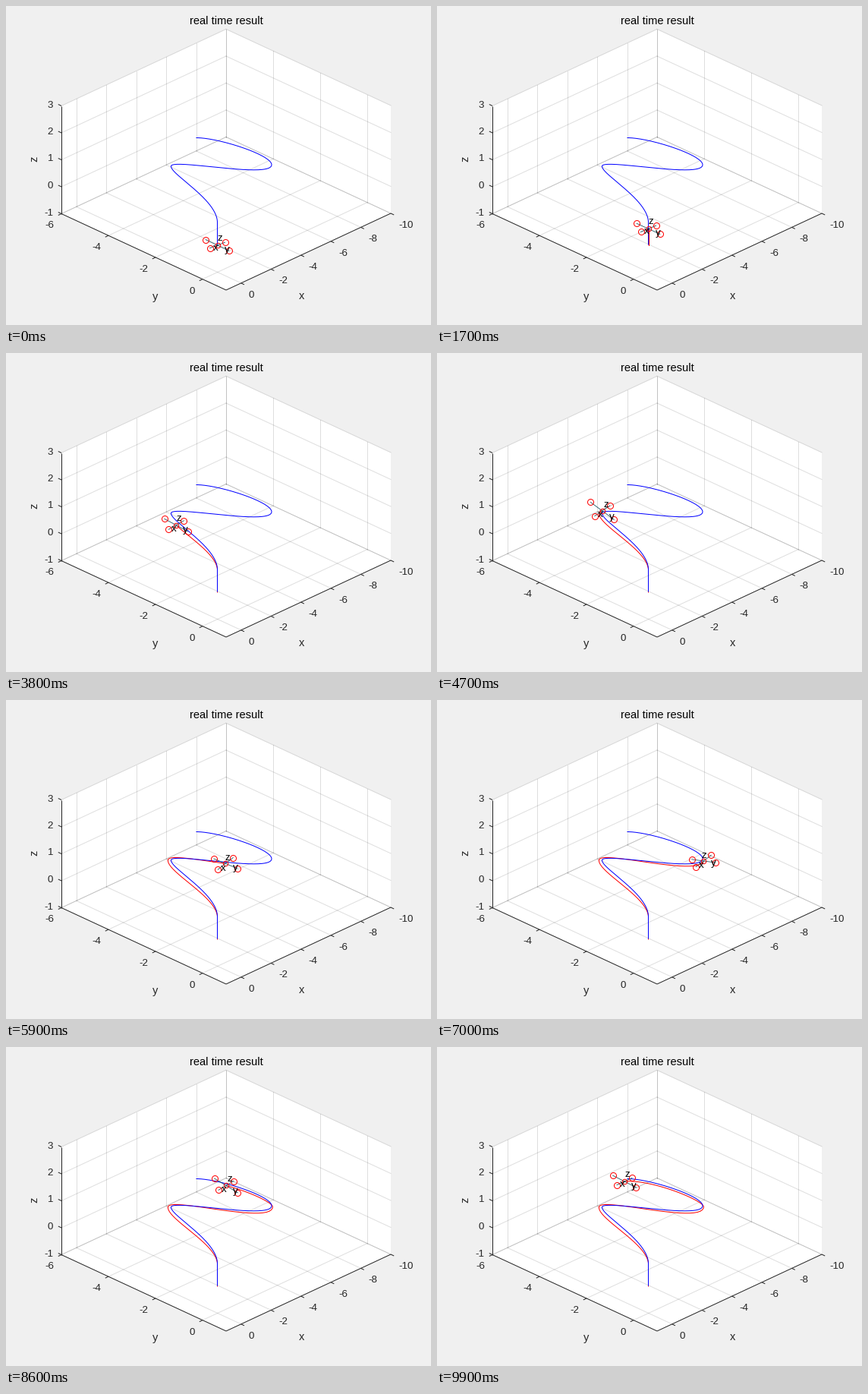
A matplotlib script that plays this animation: 560x420 px, repeating every 10000 ms.

```python
import numpy as np
import matplotlib.pyplot as plt
from matplotlib.animation import FuncAnimation

W, H = 560, 420
PX = 0.72            # points per pixel at 100 dpi
FRAMES, STEP = 100, 100
INK = (0.15, 0.15, 0.15)

plt.rcParams["font.family"] = "Liberation Sans"
fig = plt.figure(figsize=(W / 100, H / 100), dpi=100, facecolor="#f0f0f0")
ax = fig.add_axes([0, 0, 1, 1])
ax.set_xlim(0, W)
ax.set_ylim(H, 0)
ax.axis("off")


def project(x, y, z):
    """World point to stage pixel."""
    u, v = (1 - x) / 11, (1 - y) / 7
    return 290 + 217 * (u - v), 374 - 101 * u - 100.5 * v - 35.5 * (z + 1)


def line3(a, b, **style):
    ax.plot(*zip(project(*a), project(*b)), lw=PX, **style)


def label(x, y, s, size=13.33, color=INK, **kw):
    kw.setdefault("va", "baseline")
    return ax.text(x, y, s, fontsize=size * PX, color=color, **kw)


def bezier(pts, u):
    """Curve of any degree by repeated interpolation."""
    pts = [np.array(p, float) for p in pts]
    u = np.reshape(u, (-1, 1))
    while len(pts) > 1:
        pts = [a + (b - a) * u for a, b in zip(pts, pts[1:])]
    return pts[0]


# Box walls
walls = [
    [(1, 1, -1), (-10, 1, -1), (-10, -6, -1), (1, -6, -1)],
    [(1, -6, -1), (-10, -6, -1), (-10, -6, 3), (1, -6, 3)],
    [(-10, 1, -1), (-10, -6, -1), (-10, -6, 3), (-10, 1, 3)],
]
for wall in walls:
    ax.fill(*zip(*(project(*p) for p in wall)), color="white", lw=0)

# Grid, ticks and tick labels
grid = dict(color=INK, alpha=0.15)
axis = dict(color=INK, solid_capstyle="butt")


def tick(p, dx, dy):
    x, y = project(*p)
    ax.plot([x, x + dx], [y, y + dy], lw=PX, **axis)
    return x, y


for x in range(-10, 1, 2):
    line3((x, 1, -1), (x, -6, -1), **grid)
    line3((x, -6, -1), (x, -6, 3), **grid)
    tx, ty = tick((x, 1, -1), 4.2, 2)
    label(tx + 10, ty + 19, str(x))
for y in range(-6, 1, 2):
    line3((1, y, -1), (-10, y, -1), **grid)
    line3((-10, y, -1), (-10, y, 3), **grid)
    tx, ty = tick((1, y, -1), -4.2, 2)
    label(tx - 10, ty + 19, str(y), ha="right")
for z in range(-1, 4):
    line3((1, -6, z), (-10, -6, z), **grid)
    line3((-10, -6, z), (-10, 1, z), **grid)
    tx, ty = tick((1, -6, z), -4.2, -2)
    label(tx - 11, ty + 2, str(z), ha="right")

line3((1, -6, -1), (1, -6, 3), **axis)
line3((1, -6, -1), (1, 1, -1), **axis)
line3((1, 1, -1), (-10, 1, -1), **axis)

label(290, 24, "real time result", 14.67, "black", ha="center")
label(389.5, 386.5, "x", 14.67, ha="center")
label(197, 386.5, "y", 14.67, ha="center")
label(37, 201.5, "z", 14.67, ha="center", va="center", rotation=90)

# Planned path: climb, left turn, right turn, final leg
plan = [
    [(278.5, 314), (278.5, 285)],
    [(278.5, 285), (278.5, 255), (217, 222), (217.5, 211)],
    [(217.5, 211), (217, 200), (350, 228), (350, 209)],
    [(350, 209), (350, 196), (280, 173.5), (251, 173.5)],
]
route = np.vstack([bezier(p, np.linspace(0, 1, 80)) for p in plan])


def ease_in(p):
    return lambda s: s ** p


def ease_out(p):
    return lambda s: 1 - (1 - s) ** p


# Flown legs: start, end (s), easing, control points
legs = [
    (0, 2, ease_in(2), [(278.5, 315), (278.5, 285)]),
    (2, 4.3, ease_in(1.25),
     [(278.5, 285), (277, 259), (213, 227), (213.3, 211)]),
    (4.3, 7.05, ease_in(1.15),
     [(213.3, 211), (213, 196), (350, 235), (351.5, 210.5)]),
    (7.05, 9.9, ease_out(1.4),
     [(351.5, 210.5), (351, 202), (283, 174), (247, 177)]),
]


def position(t):
    for t0, t1, ease, pts in legs:
        if t <= t1:
            break
    return bezier(pts, ease(min((t - t0) / (t1 - t0), 1)))[0]


def attitude(t):
    """Half-arms along y and x, and the z axis, in pixels."""
    swell = np.exp(-((t - 6.3) / 2.9) ** 2)
    lean = 5.6 * swell * np.cos(2 * np.pi * (t - 4.65) / 4.5)
    return np.array([(15.4, 7.3 + lean),
                     (-10, 3.7 + 4.2 * swell),
                     (0.5 * lean, -10.6 + 2 * swell)])


# The craft rests for the first two steps
clock = [0 if n < 2 else n * STEP / 1000 for n in range(FRAMES)]
centers = np.array([position(t) for t in clock])

trail, = ax.plot([], [], color="red", lw=PX, zorder=3)
ax.plot(*route.T, color="blue", lw=PX, zorder=4)
arms = [ax.plot([], [], color="#14505f", lw=0.8 * PX, zorder=5)[0]
        for _ in range(2)]
ring = dict(ls="", marker="o", mfc="none", mec="red", mew=PX, zorder=6)
rotors, = ax.plot([], [], ms=8 * PX, **ring)
hub, = ax.plot([], [], ms=6.5 * PX, **ring)
names = [label(0, 0, s, color="black", zorder=7) for s in "yxz"]


def draw(n):
    c = centers[n]
    ya, xa, za = attitude(clock[n])
    trail.set_data(*centers[:n + 1].T)
    for arm, v in zip(arms, (ya, xa)):
        arm.set_data(*np.array([c - v, c + v]).T)
    rotors.set_data(*np.array([c - ya, c + ya, c - xa, c + xa]).T)
    hub.set_data([c[0]], [c[1]])
    for name, v in zip(names, (0.6 * ya, 0.6 * xa, za)):
        name.set_position(c + v + (0, 4.5))
    return [trail, *arms, rotors, hub, *names]


anim = FuncAnimation(fig, draw, frames=FRAMES, interval=STEP,
                     init_func=lambda: draw(0), repeat=True, repeat_delay=0)
plt.show()
```
